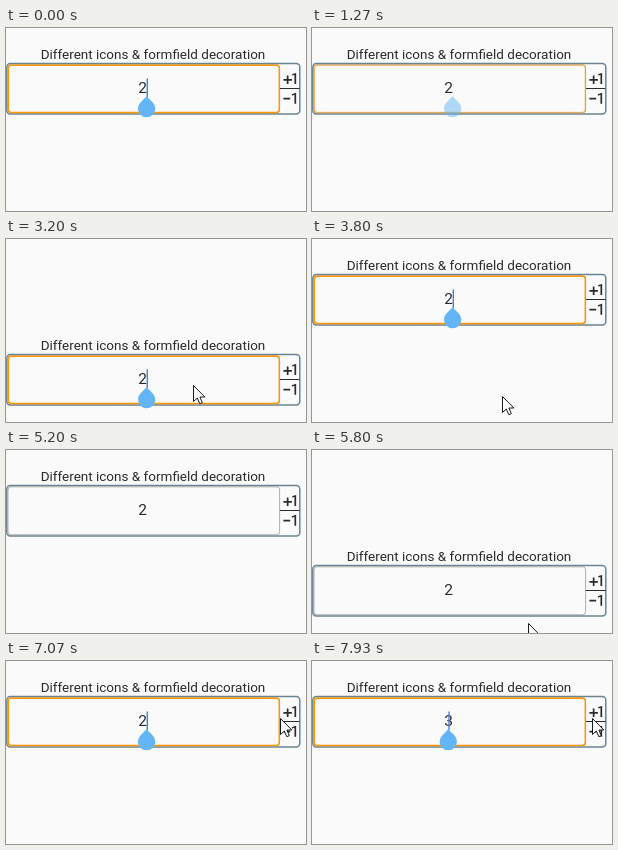
An HTML page for the animation above (8000 ms loop, 300 by 183 pixels).

```html
<!DOCTYPE html>
<html lang="en">
<head>
<meta charset="utf-8">
<title>Number field</title>
<style>
  html, body { margin: 0; width: 100%; height: 100%; overflow: hidden; background: #fafafa; }
  svg { display: block; width: 300px; height: 183px; }
  text { font-family: Roboto, sans-serif; fill: #2b2b2b; text-anchor: middle; }
  .title { font-size: 13.5px; }
  .value { font-size: 15.5px; }
  .box { fill: none; }
</style>
</head>
<body>
<svg viewBox="0 0 300 183">
  <g id="form">
    <text class="title" x="147" y="31">Different icons &amp; formfield decoration</text>
    <rect class="box" x=".8" y="35.5" width="293" height="50.5" rx="3.5" stroke="#6a8494" stroke-width="1.5"/>
    <rect class="box" x="2" y="36.8" width="271.6" height="48" rx="3" stroke="#9a9a9a" stroke-width=".8"/>
    <rect id="ring" class="box" x="2.3" y="37.2" width="271" height="47.2" rx="2.8" stroke="#ff9800" stroke-width="1.5"/>
    <g fill="#2b2b2b">
      <path transform="translate(274 40.8) scale(.85)" d="M10 8H8v4H4v2h4v4h2v-4h4v-2h-4zm4.5-1.92V7.9l2.5-.5V18h2V5z"/>
      <path d="M274 60h19.5v1h-19.500z"/>
      <path transform="translate(274 60.5) scale(.85)" d="M4 11v2h8v-2zm15 7h-2V7.380L14 8.400V6.700L18.700 5h.3z"/>
    </g>
    <text id="value" class="value" x="136.5" y="65">2</text>
    <g id="mark">
      <rect id="caret" x="0" y="50.5" width="1.400" height="18.500" fill="#4a7fd6"/>
      <path id="handle" d="M0 68.300l6.150 6.150a8.700 8.700 0 1 1-12.300 0z" fill="#64b5f6"/>
    </g>
  </g>
  <path id="mouse" d="M0 0V16L3.800 12.500 6.300 18.200 8.800 17.100 6.400 11.500H11.300Z" fill="#fff" stroke="#000" stroke-width=".9"/>
</svg>
<script>
const $ = id => document.getElementById(id);
const LOOP = 8000, TICKS = 120; // the screen refreshes 15 times a second
const BLINK = 8, EDIT = 117;    // in ticks, like all times below

// A tap focuses the field, the form rises; on blur it fades, then drops back.
const sessions = [
  { tap: -8, rise: -1, blur: 18, drop: 20 },
  { tap: 44, rise: 50, blur: 74, drop: 79 },
  { tap: 98, rise: 103, blur: TICKS, drop: TICKS }
];

// Each visit of the mouse starts at a point and glides: [start, end, x, y]
const visits = [
  { from: 33, to: 59, x: 202, y: 179, glides: [[33, 39, 188, 146], [56, 58, 194, 167]] },
  { from: 87, to: TICKS, x: 217, y: 173, glides: [
    [89, 91, 198, 141], [97, 100, 212, 130], [100, 107, 286, 45],
    [108, 110, 285, 25], [110, 112, 281, 51], [116, 119, 281, 57]] }
];

const clamp = v => Math.min(1, Math.max(0, v));

function move(el, x, y) {
  el.setAttribute('transform', `translate(${x} ${y})`);
}

function drawForm(t) {
  const s = sessions.find(s => t >= s.tap && t < s.drop);
  const focus = s ? Math.min(clamp((t - s.tap - 1) / 1.25), clamp(1 - (t - s.blur) / 2)) : 0;
  const raised = s && t >= s.rise;
  const edited = t >= EDIT;
  const blinkTime = t - (edited ? EDIT : s ? s.rise : 0);
  const caret = s && t <= s.blur && (!raised || blinkTime % (2 * BLINK) < BLINK);

  move($('form'), 0, raised ? 0 : 80);
  $('ring').style.opacity = $('handle').style.opacity = focus;
  $('value').textContent = edited ? 3 : 2;
  move($('mark'), edited ? 136.3 : 140.6, 0);
  $('caret').style.opacity = caret ? 1 : 0;
}

function drawMouse(t) {
  const visit = visits.find(v => t >= v.from && t < v.to);
  $('mouse').style.display = visit ? '' : 'none';
  if (!visit) return;
  let { x, y } = visit;
  for (const [start, end, toX, toY] of visit.glides) {
    const p = clamp((t - start) / (end - start));
    x += (toX - x) * p;
    y += (toY - y) * p;
  }
  move($('mouse'), Math.round(x) - .5, Math.round(y) + .5);
}

const begin = performance.now();
(function frame() {
  const ms = (performance.now() - begin) % LOOP;
  const t = Math.floor(ms / LOOP * TICKS + .1) % TICKS;
  drawForm(t);
  drawMouse(t);
  requestAnimationFrame(frame);
})();
</script>
</body>
</html>
```
